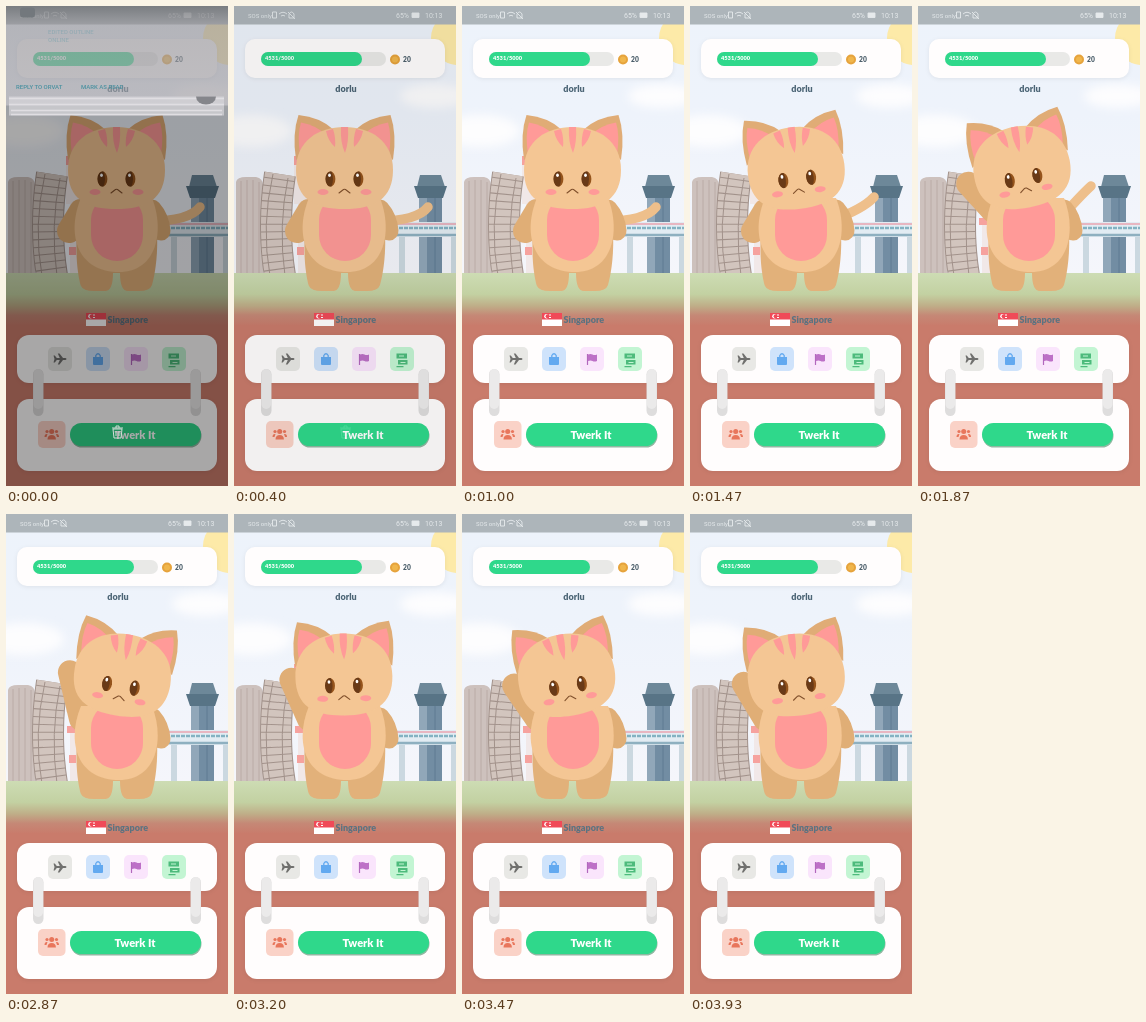
Recreate the animation shown at these times as an HTML page. Size 222 px wide and 480 px high, loop 3990 ms.

```html
<!DOCTYPE html>
<html lang="en">
<head>
<meta charset="utf-8">
<title>Pet home screen</title>
<style>
  html, body { margin: 0; width: 100%; height: 100%; overflow: hidden; }
  svg { display: block; width: 100vw; height: 100vh; }
  text { font-family: Lato, "Open Sans", sans-serif; font-weight: 900; }
  .status text { font: 400 7px Roboto, sans-serif; fill: #e6eaec; }
  .panel text { font: 500 6px Roboto, sans-serif; fill: #4a91a0; }
  .card { fill: #fffdfd; filter: drop-shadow(0 1px 2px #0001); }
  .rib { fill: none; stroke-dasharray: 6.5 1; }
</style>
</head>
<body>
<svg viewBox="0 0 222 480" preserveAspectRatio="none">
  <defs>
    <linearGradient id="sky" x2="0" y2="1">
      <stop stop-color="#edf3fb"/><stop offset=".4" stop-color="#eef3fb"/>
      <stop offset="1" stop-color="#f5f6fb"/>
    </linearGradient>
    <linearGradient id="land" x2="0" y2="1">
      <stop stop-color="#cddcb4"/><stop offset=".4" stop-color="#c3d1a2"/>
      <stop offset=".62" stop-color="#bfae88"/><stop offset=".8" stop-color="#c58876"/>
      <stop offset="1" stop-color="#c97b6b"/>
    </linearGradient>
    <linearGradient id="shade" x2="0" y2="1">
      <stop stop-color="#7f8186"/><stop offset=".2" stop-color="#cbc9cf"/>
      <stop offset="1" stop-color="#d8d5dc"/>
    </linearGradient>
    <filter id="soft"><feGaussianBlur stdDeviation="5"/></filter>
    <g id="ear">
      <path d="M62 154Q58 128 64.500 109Q86 111 100 124Z" fill="#e0ac76"/>
      <path d="M66 148Q63 129 67 116.500Q82 119 92 129Z" fill="#ff9a98"/>
    </g>
    <g id="eye">
      <ellipse rx="4.900" ry="7.600" fill="#95541c"/>
      <path d="M1-7.400A4.900 7.600 0 1 0 1 7.400Q4 0 1-7.400Z" fill="#693a17"/>
      <ellipse cx="-1" cy="-3.800" rx="1.400" ry="1.800" fill="#fff"/>
    </g>
    <g id="link">
      <rect x="27" y="363" width="10.500" height="47" rx="5.200" fill="#dedddd"/>
      <rect x="27.500" y="363" width="9.500" height="40" rx="4.700" fill="#ebeaea"/>
    </g>
  </defs>

  <!-- scenery -->
  <rect width="222" height="270" fill="url(#sky)"/>
  <g fill="#fdfdfe" filter="url(#soft)">
    <ellipse cx="18" cy="125" rx="40" ry="16"/><ellipse cx="200" cy="90" rx="34" ry="12"/>
  </g>
  <circle cx="224" cy="32" r="27" fill="#fdeaa8"/>
  <path d="M60 150h12v118h-8v-70h-4z" fill="#f1e8e8"/>
  <path d="M60 150h9v9h-9zM61 212h9v7h-9zM63 241h7v8h-7z" fill="#f6a29e"/>
  <path d="M2 270V176Q3 171 12 171H22Q29 172 29 180V270Z" fill="#cdc1bd"/>
  <path d="M7 175V268M13 174V268M19 174V268M25 176V268" stroke="#b5a6a1" stroke-width=".8"/>
  <g stroke="#a2928b" fill="none">
    <path d="M46 270Q38 220 46 168" stroke-width="32"/>
    <path class="rib" d="M46 270Q38 220 46 168" stroke-width="30" stroke="#d2c5be"/>
    <path d="M36 270Q27 220 39 168M51 270Q44 220 54 172"/>
  </g>
  <path d="M185 192H208V270H185Z" fill="#728da3"/>
  <path d="M185 192H193V270H185Z" fill="#91a7b9"/>
  <path d="M201 192V270" stroke="#5f7b92"/>
  <path d="M186 169H207L211 181H183Z" fill="#6d8899"/>
  <path d="M180 180H213L209 192H184Z" fill="#587486"/>
  <path d="M150 216H222V231H150Z" fill="#e2ecf3"/>
  <path d="M150 218H222" stroke="#e8a5b0" stroke-width="1.500"/>
  <path d="M150 222H222" stroke="#83b2c2" stroke-width="2.500" stroke-dasharray="4 1"/>
  <path d="M150 229H222" stroke="#8eb0c0" stroke-width="2.500"/>
  <path d="M165 231H171V270H165ZM217 231H222V270H217Z" fill="#cbd8e0"/>
  <rect y="267" width="222" height="53" fill="url(#land)"/>
  <rect y="319" width="222" height="161" fill="#c97b6b"/>

  <!-- pet -->
  <path id="tail" fill="none" stroke="#eebf8b" stroke-width="9.500" stroke-linecap="round"/>
  <path id="arm" fill="none" stroke="#e0ae76" stroke-width="24" stroke-linecap="round"/>
  <path d="M146 203Q154 212 155 225" fill="none" stroke="#e0ae76" stroke-width="19" stroke-linecap="round"/>
  <path d="M71 225C69 255 73 274 75 280Q77 285 88 285H99Q107 285 107 267H114Q114 285 122 285H133Q144 285 146 279C150 265 152 245 151 225Z" fill="#e2b17a"/>
  <path d="M75 192C61 225 69 264 110 266S159 225 146 192Z" fill="#f4c694"/>
  <rect x="85" y="188" width="52" height="67" rx="26" fill="#ff9a98"/>
  <g id="head">
    <use href="#ear"/><use href="#ear" transform="translate(221 0) scale(-1 1)"/>
    <path d="M62 164C62 135 84 121 110.500 121S159 135 159 164S140 203 110.500 203S62 194 62 164Z" fill="#f4c694"/>
    <path d="M92 125L99 123Q102 132 101 141Q94 135 92 125ZM107 121H114Q115 136 111 147Q106 136 107 121ZM122 123L129 125Q127 135 120 141Q119 132 122 123Z" fill="#ff9a98"/>
    <g fill="#ff9a98"><ellipse cx="89" cy="186" rx="5.500" ry="3"/><ellipse cx="132" cy="186" rx="5.500" ry="3"/></g>
    <use href="#eye" x="96.500" y="173"/><use href="#eye" x="124.500" y="173"/>
    <path d="M105 187L109.500 183.500Q110.500 183 111.500 183.500L116 187" fill="none" stroke="#80502c" stroke-width="1.100" stroke-linecap="round"/>
  </g>

  <!-- header -->
  <g class="status">
    <rect width="222" height="18.500" fill="#adb5ba"/>
    <text x="14" y="11.500" style="font-size:6px">SOS only</text>
    <g fill="none" stroke="#e6eaec" stroke-width=".9">
      <path d="M38.500 6h4v6h-4zM45 8q4-3.500 8 0M47 10q2-1.500 4 0M55 12v-4q2.500-4 5 0v4zM54 6l7 7"/>
      <path d="M178 7h7v4.500h-7z" fill="#e6eaec"/>
    </g>
    <text x="162" y="12">65%</text><text x="191" y="12">10:13</text>
  </g>
  <rect class="card" x="11" y="33" width="200" height="39" rx="10"/>
  <rect x="27" y="46" width="125" height="14" rx="7" fill="#e9e9e7"/>
  <rect x="27" y="46" width="101" height="14" rx="7" fill="#2fd88b"/>
  <text x="31" y="54" font-size="5.700" fill="#fff">4531/5000</text>
  <circle cx="161" cy="53.500" r="5" fill="#e6a33c"/><circle cx="161" cy="53.500" r="3" fill="#f0b64c"/>
  <text x="169" y="55.500" font-size="6.700" fill="#4c5f6b">20</text>
  <text x="112" y="86" font-size="9" fill="#4c6576" text-anchor="middle">dorlu</text>

  <!-- location -->
  <path d="M80 307h20v13h-20z" fill="#fff"/><path d="M80 307h20v6.500h-20z" fill="#f04a58"/>
  <circle cx="84.500" cy="310.200" r="2.300" fill="#fff"/><circle cx="85.600" cy="310.200" r="2" fill="#f04a58"/>
  <path d="M87 309h2M87 311.500h2" stroke="#fff"/>
  <text x="101.500" y="317" font-size="9" fill="#5c7280">Singapore</text>

  <!-- controls -->
  <rect class="card" x="11" y="329" width="200" height="48" rx="12"/>
  <rect class="card" x="11" y="393" width="200" height="72" rx="12"/>
  <use href="#link"/><use href="#link" x="157.500"/>
  <rect x="42" y="341" width="24" height="24" rx="5" fill="#e8e8e5"/>
  <rect x="80" y="341" width="24" height="24" rx="5" fill="#cfe3fb"/>
  <rect x="118" y="341" width="24" height="24" rx="5" fill="#fae5fc"/>
  <rect x="156" y="341" width="24" height="24" rx="5" fill="#c3f5d3"/>
  <path d="M47.500 349.500h1.300l2 2.500h3l-2-4.500h1.700l3.500 4.500h2.500q2 1 0 2h-2.500l-3.500 4.500h-1.700l2-4.500h-3l-2 2.500h-1.300l1-3.500z" fill="#70706e"/>
  <path d="M87 351h10v7q0 1-1 1h-8q-1 0-1-1z" fill="#62a9f0"/>
  <path d="M89.800 352v-2.500q2.200-3.500 4.400 0v2.500" fill="none" stroke="#62a9f0" stroke-width="1.300"/>
  <path d="M125.500 348v11" stroke="#b268bd" stroke-width="1.200"/>
  <path d="M126 348.500q2.500-1 4.500 0t4.500 0v6.500q-2.500 1-4.500 0t-4.500 0z" fill="#bd70c7"/>
  <g fill="#4dbb7c">
    <path d="M162.500 347.500h10.500v5h-10.500zM164 354h9.500v4.500h-9.500zM162.500 360h7v1.200h-7z"/>
    <path d="M165 349.500h5v1h-5zM166.500 356h5v.9h-5z" fill="#c3f5d3"/>
  </g>
  <rect x="32" y="415" width="27.500" height="27" rx="5" fill="#fad2c7"/>
  <g fill="#e8765c">
    <circle cx="45.700" cy="425.500" r="2.500"/><circle cx="41" cy="425.500" r="1.600"/><circle cx="50.500" cy="425.500" r="1.600"/>
    <path d="M41.500 433.500q0-4.500 4.200-4.500t4.200 4.500zM38.500 431q0-3.500 3-3l-1 3zM53 431q0-3.500-3-3l1 3z"/>
  </g>
  <rect x="64.500" y="418.500" width="131" height="23" rx="11.500" fill="#90b8a2"/>
  <rect x="64" y="417" width="131" height="23" rx="11.500" fill="#2fd88b"/>
  <text x="129" y="432.500" font-size="11" fill="#fff" text-anchor="middle">Twerk It</text>

  <!-- closing notification shade -->
  <g id="dim">
    <rect width="222" height="480" opacity=".34"/>
    <path d="M107 423h9l-1 9h-7zM106 422h11M110 422v-2h3v2M110 425v5M113 425v5" fill="none" stroke="#d3dcd7"/>
  </g>
  <g id="panel" class="panel">
    <path d="M0 0H222V100H0Z" fill="url(#shade)" opacity=".5"/>
    <path d="M3 91H218V110H3Z" fill="#d8d6db" opacity=".7"/>
    <path d="M3 93H218M3 99H218M5 105H216M5 109H216" stroke="#e0dee2" stroke-width="1.500"/>
    <path d="M190 91a10 8 0 0 0 20 0z" fill="#85868b"/>
    <rect x="14" y="2" width="15" height="10" rx="3" fill="#73787d"/>
    <g opacity=".3"><text x="42" y="29">EDITED OUTLINE</text><text x="42" y="37">ONLINE</text></g>
    <text x="10" y="84">REPLY TO ORVAT</text><text x="75" y="84">MARK AS READ</text>
  </g>
</svg>
<script>
  const LOOP = 3990;
  const $ = id => document.getElementById(id);
  const set = (id, name, value) => $(id).setAttribute(name, value);
  const mix = (a, b, k) => a + (b - a) * k;
  const ramp = (t, from, to) => {
    const k = Math.min(1, Math.max(0, (t - from) / (to - from)));
    return k * k * (3 - 2 * k);
  };

  function draw(t) {
    const sway = Math.cos((t - 2700) / 1900 * 2 * Math.PI);
    const tilt = t < 1275 ? 0 : 11.3 * sway;
    const lift = -1.5 * ramp(t, 1300, 1870);
    set('head', 'transform', `translate(0 ${lift}) rotate(${tilt} 110.5 200)`);

    const raise = ramp(t, 1550, 1950);
    const pawX = mix(63, 58 + 7 * sway, raise) - 8 * Math.sin(Math.PI * raise);
    const pawY = mix(225, 165 - 8 * sway, raise);
    set('arm', 'd', `M75 205L${pawX} ${pawY}`);

    // The tail curls upward, then tucks behind the body.
    const curl = ramp(t, 1100, 1870), tuck = ramp(t, 1870, 2300);
    const tipX = mix(mix(194, 173, curl), 138, tuck);
    const tipY = mix(mix(201, 180, curl), 208, tuck);
    const bendX = mix(mix(182, 162, curl), 136, tuck);
    const bendY = mix(mix(216, 190, curl), 218, tuck);
    set('tail', 'd', `M140 215Q${bendX} ${bendY} ${tipX} ${tipY}`);

    set('dim', 'opacity', 1 - ramp(t, 0, 530));
    const slide = 1 - (1 - Math.min(1, t / 430)) ** 2;
    set('panel', 'transform', `translate(0 ${-112 * slide})`);
  }

  const start = performance.now();
  function tick() {
    draw((performance.now() - start) % LOOP);
    requestAnimationFrame(tick);
  }
  tick();
</script>
</body>
</html>
```
